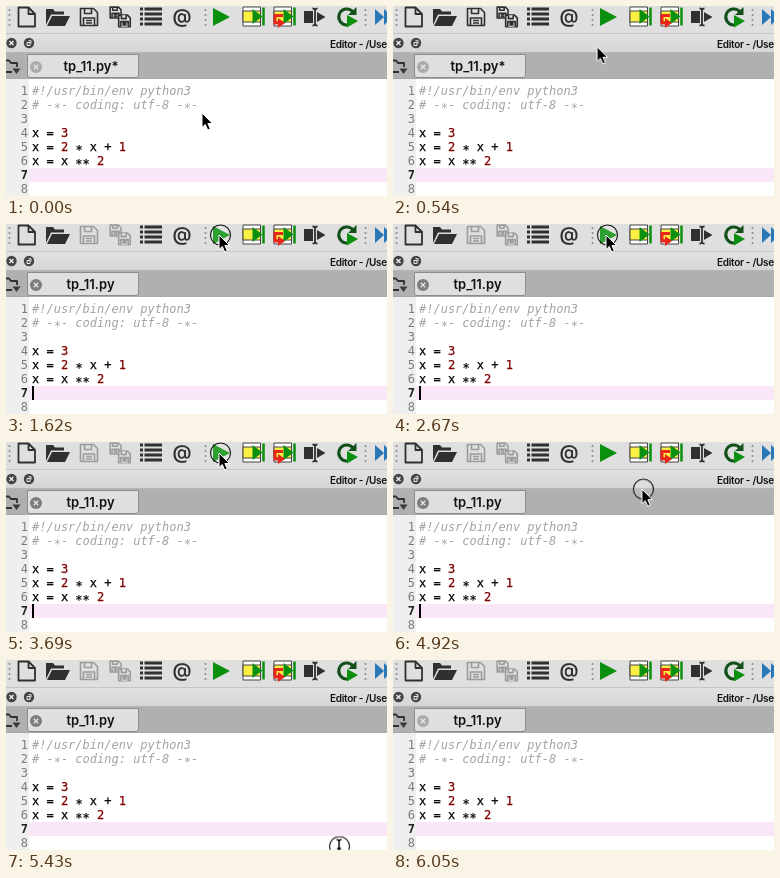
Animation of 381 by 190 pixels, one loop 6100 ms. Source, as an HTML page:

```html
<!DOCTYPE html>
<html lang="en">
<head>
<meta charset="utf-8">
<title>Editor</title>
<style>
html, body { margin: 0; width: 100%; height: 100%; overflow: hidden; background: #fff; }
svg { display: block; }
.ui { font-family: Inter, Roboto, sans-serif; font-weight: 600; }
.code { font: 12px "DejaVu Sans Mono", "Liberation Mono", monospace; white-space: pre; stroke-width: .25px; }
.code text { fill: #000; stroke: #000; }
.code .note { fill: #a3a3a3; stroke: none; font-style: italic; }
.code .num { fill: #800000; stroke: #800000; }
.code .star { baseline-shift: -2.5px; }
.code .ln { fill: #7c7c7c; stroke: none; text-anchor: end; }
.code .now { fill: #222; font-weight: bold; }
.line { fill: none; stroke: #303030; stroke-width: 1.8; stroke-linejoin: round; }
.grip { stroke: #8f8f8f; stroke-width: 1.6; stroke-dasharray: 2 3; }
.save, .dirty, .clean, .caret, .blur, .play, .ring, .arrow, .beam {
  animation: 6100ms step-end infinite;
}
.pointer { animation: move 6100ms linear infinite; }
.save { animation-name: save; }
.dirty { animation-name: dirty; }
.clean { animation-name: clean; }
.caret { animation-name: blink; }
.blur { animation-name: focus; }
.play { animation-name: press; }
.ring { animation-name: ring; }
.arrow { animation-name: arrow; }
.beam { animation-name: beam; }
@keyframes save { 0% { stroke: #303030; } 26.557%, 100% { stroke: #9c9c9c; } }
@keyframes dirty { 0% { opacity: 1; } 26.557%, 100% { opacity: 0; } }
@keyframes clean { 0% { opacity: 0; } 26.557%, 100% { opacity: 1; } }
@keyframes focus { 0%, 99.18%, 100% { fill: #ababab; } 24.098% { fill: #7d7d7d; } }
@keyframes press { 0%, 26.557%, 100% { fill: #0a8f0e; } 22.623% { fill: #06650a; } }
@keyframes ring { 0% { opacity: 0; } 22.623%, 100% { opacity: 1; } }
@keyframes arrow { 0% { opacity: 1; } 81.34%, 100% { opacity: 0; } }
@keyframes beam { 0% { opacity: 0; } 81.34%, 100% { opacity: 1; } }
@keyframes blink {
  0%, 34.918%, 52.131%, 69.344%, 86.066%, 99.18%, 100% { opacity: 0; }
  24.098%, 43.77%, 60.492%, 77.213%, 93.279% { opacity: 1; }
}
@keyframes move {
  0% { transform: translate(196px, 107px); }
  3.7% { transform: translate(196px, 107px); animation-timing-function: cubic-bezier(.4, .1, .7, .8); }
  8.852% { transform: translate(204px, 41px); animation-timing-function: cubic-bezier(.2, .5, .5, 1); }
  13.934%, 15.2% { transform: translate(214px, 12px); }
  17.213%, 80% { transform: translate(213px, 11px); }
  80.656% { transform: translate(248.5px, 46.5px); animation-timing-function: cubic-bezier(.2, .5, .5, 1); }
  89.016% { transform: translate(332px, 186.5px); }
  90% { transform: translate(335px, 189px); }
  93.279%, 99.999% { transform: translate(341px, 203px); }
  100% { transform: translate(196px, 107px); }
}
</style>
</head>
<body>
<svg width="381" height="190" viewBox="0 0 381 190">
  <defs>
    <linearGradient id="bar" x2="0" y2="1">
      <stop stop-color="#e2e2e2"/><stop offset="1" stop-color="#d4d4d4"/>
    </linearGradient>
    <g id="disk">
      <path d="M1 1H14L18 5V18H1Z"/>
      <path d="M5 1V6H12V1M4 18V10.500H15V18M6.500 13H12.500M6.500 15.500H12.500"/>
    </g>
    <g id="cell">
      <path d="M.5 .5H18V19.500H.5Z" fill="#fff" stroke="#444"/>
      <path d="M.5 4.500H18V15.500H.5Z" fill="#fbef43" stroke="#444"/>
      <path d="M10 2.500L20 10L10 17.500Z" fill="#0a8f0e"/>
      <path d="M21 1V19" stroke="#0a8f0e" stroke-width="2.500"/>
    </g>
    <path id="ibeam" d="M-1.500 -7Q1 -7 1 -5Q1 -7 3.500 -7M1 -5V5M-1.500 7Q1 7 1 5Q1 7 3.500 7M-1 2H3"/>
  </defs>

  <rect width="381" height="28" fill="#dfdfdf"/>
  <path class="grip" d="M3.500 3V20M199.500 3V20M359.500 3V20"/>
  <path class="line" d="M12.500 1.500H22.500L29 8V20.500H12.500ZM22.500 1.500V8H29"/>
  <path d="M40 19V3H47L49 5.500H58V8.500H45ZM41 20L46 10H64L59 20Z" fill="#303030"/>
  <g class="line save">
    <use href="#disk" x="73.500" y="1.500" stroke-width="1.600"/>
    <g stroke-width="2.400">
      <use href="#disk" transform="translate(103.500 .5) scale(.64)"/>
      <use href="#disk" transform="translate(112 8.500) scale(.68)" fill="#dfdfdf"/>
    </g>
  </g>
  <path d="M134 3H137M134 8H137M134 13H137M134 18H137M138.500 3H156M138.500 8H156M138.500 13H156M138.500 18H156" stroke="#303030" stroke-width="2.800"/>
  <text class="ui" x="176" y="17" font-size="19" text-anchor="middle" fill="#303030">@</text>
  <path class="play" d="M207 2L224 11L207 20Z"/>
  <use href="#cell" x="236.500" y=".5"/>
  <use href="#cell" x="267.500" y=".5"/>
  <path d="M277 9.500H269V17H273" fill="none" stroke="#e8261c" stroke-width="3"/>
  <path d="M272 12L279 17L272 22Z" fill="#e8261c"/>
  <path d="M298 5H307V17H298Z" fill="#303030"/>
  <path class="line" d="M306.500 2.500Q309 2.500 309 4Q309 2.500 311.500 2.500M309 4V18M306.500 19.500Q309 19.500 309 18Q309 19.500 311.500 19.500" stroke-width="1.500"/>
  <path d="M311 6L319.500 11L311 16Z" fill="#303030"/>
  <path d="M347 6A8 8 0 1 0 341 19" fill="none" stroke="#14501a" stroke-width="3"/>
  <path d="M350.500 1V9H342Z" fill="#14501a"/>
  <path d="M341 9L352 15L341 21.500Z" fill="#0a8f0e"/>
  <path d="M369 3L378 11L369 19ZM378 3L387 11L378 19Z" fill="#2878b8"/>

  <rect y="27" width="381" height="20" fill="url(#bar)"/>
  <path d="M0 27.500H381" stroke="#c5c5c5"/>
  <path d="M0 46.500H381" stroke="#b5b5b5"/>
  <g fill="#444"><circle cx="5.500" cy="37" r="5.200"/><circle cx="23" cy="37" r="5.200"/></g>
  <path d="M3.500 35L7.500 39M7.500 35L3.500 39" stroke="#eee" stroke-width="1.400"/>
  <path d="M21 36.500H24V39.500H21ZM22.500 34.700H25V37.500" fill="none" stroke="#eee"/>
  <text class="ui" x="324" y="41.500" font-size="10" letter-spacing="-.3" fill="#111">Editor - /Users/</text>

  <rect y="47" width="381" height="26" fill="#b0b0b0"/>
  <path d="M21.500 48.500H132.500V69Q132.500 71.500 130 71.500H24Q21.500 71.500 21.500 69Z" fill="#dfdfdf" stroke="#8c8c8c"/>
  <path d="M0 72.500H381" stroke="#a8a8a8"/>
  <path class="line" d="M0 54.500H3L5 57H11V61M0 66H6" stroke-width="1.400"/>
  <path d="M6.500 62.500H14.500L10.500 68Z" fill="#3a3a3a"/>
  <circle class="blur" cx="30" cy="61" r="6"/>
  <path d="M27.800 58.800L32.200 63.200M32.200 58.800L27.800 63.200" stroke="#e6e6e6" stroke-width="1.300"/>
  <g class="ui" font-size="13" text-anchor="middle" fill="#111">
    <text class="dirty" x="85" y="65">tp_11.py*</text>
    <text class="clean" x="84.500" y="65">tp_11.py</text>
  </g>

  <rect y="73" width="381" height="117" fill="#fff"/>
  <rect y="73" width="23" height="117" fill="#efefef"/>
  <rect x="23" y="162" width="358" height="14" fill="#f9e7f8"/>
  <g class="code" id="code"></g>
  <rect class="caret" x="26" y="162" width="2" height="14" fill="#000"/>

  <g class="pointer">
    <circle class="ring" cx="1.500" r="10" fill="#fff" fill-opacity=".15" stroke="#111" stroke-width="1.100"/>
    <path class="arrow" d="M0 0V14.500L3.300 11.500L5.700 17L8.300 15.900L5.900 10.500H10.500Z" fill="#000" stroke="#fff" stroke-linejoin="round"/>
    <g class="beam" fill="none">
      <use href="#ibeam" stroke="#fff" stroke-width="2.800"/>
      <use href="#ibeam" stroke="#000" stroke-width="1.400"/>
    </g>
  </g>
</svg>
<script>
const lines = ['#!/usr/bin/env python3', '# -*- coding: utf-8 -*-', '', 'x = 3', 'x = 2 * x + 1', 'x = x ** 2', '', ''];
const code = document.getElementById('code');

function put(tag, text, parent, attrs) {
  const el = document.createElementNS('http://www.w3.org/2000/svg', tag);
  for (const key in attrs) el.setAttribute(key, attrs[key]);
  el.textContent = text;
  parent.append(el);
  return el;
}

lines.forEach((line, i) => {
  const y = 89 + 14 * i;
  const note = line.startsWith('#');
  put('text', i + 1, code, { x: 22, y, class: i === 6 ? 'ln now' : 'ln' });
  const row = put('text', '', code, { x: 26, y, class: note ? 'note' : '' });
  for (const part of line.split(note ? /(\*+)/ : /(\*+|\d)/)) {
    const kind = part.startsWith('*') ? 'star' : !note && /\d/.test(part) ? 'num' : '';
    put('tspan', part, row, { class: kind });
  }
});
</script>
</body>
</html>
```
